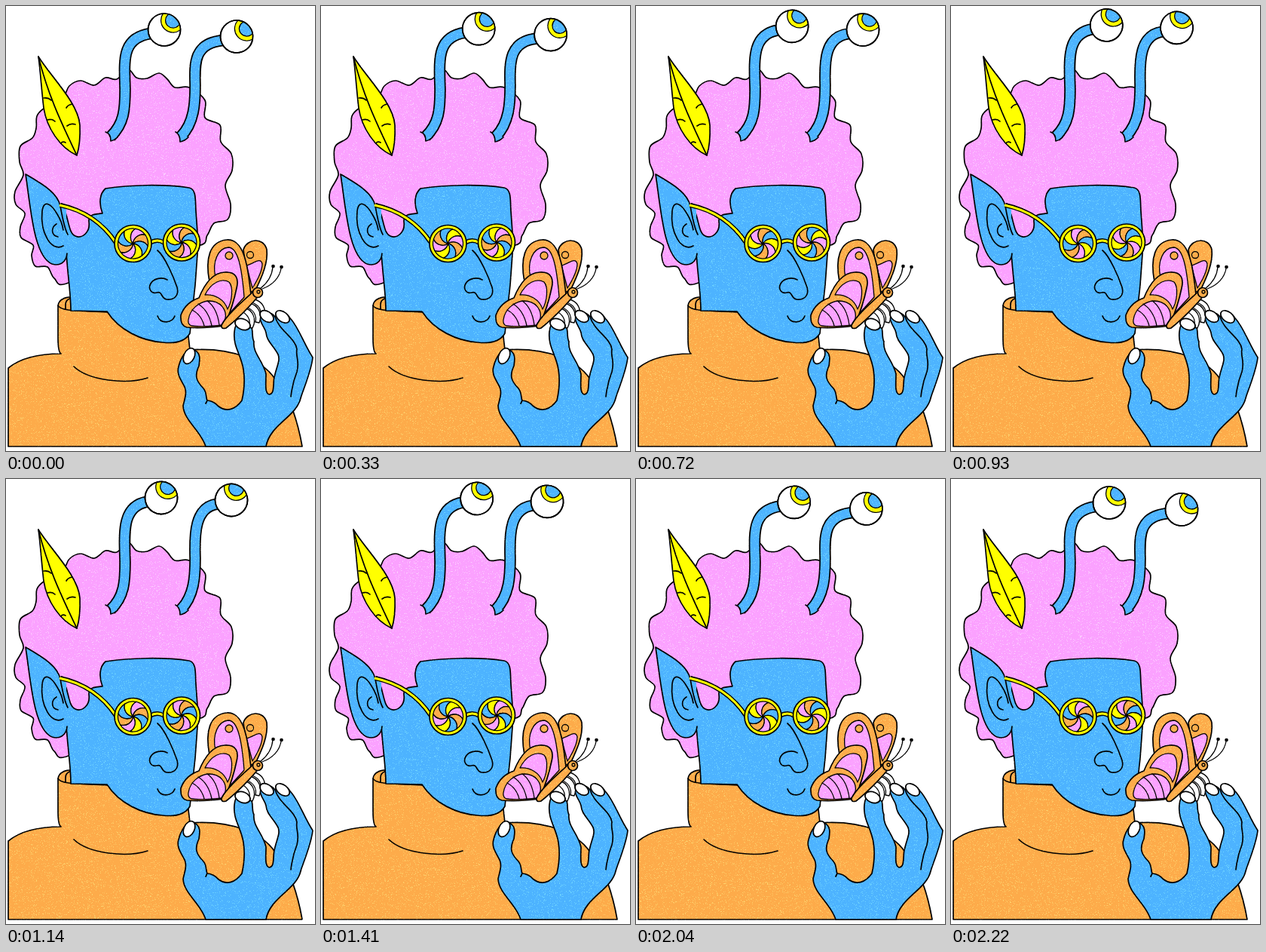
These frames come from a looping animation (410 px wide and 590 px high, 2.25 s). An HTML page with a canvas:

```html
<!DOCTYPE html>
<html lang="en">
<head>
<meta charset="utf-8">
<title>Butterfly friend</title>
<style>
  html, body { margin: 0; width: 100%; height: 100%; overflow: hidden; background: #fff; }
  body { position: relative; isolation: isolate; }
  svg { position: absolute; left: 0; top: 0; display: block; }
  #grain { position: absolute; left: 0; top: 0; mix-blend-mode: overlay; }
  svg * { stroke-linejoin: round; }
  .ink { fill: none; stroke: #000; stroke-width: 1.7; stroke-linecap: round; }
  .frame { stroke-width: 6; stroke-linecap: butt; }
  .gold { stroke: #ff0; stroke-width: 3; stroke-linecap: butt; }
  .thin { stroke-width: 1.3; }
  .blue { fill: #4db3ff; }
  .pink { fill: #fba1ff; }
  .orange { fill: #fdab4a; }
  .yellow { fill: #ff0; }
  .white { fill: #fff; }
</style>
</head>
<body>
<svg width="410" height="590" viewBox="0 0 410 590">
  <defs>
    <clipPath id="eyeball"><circle r="21"/></clipPath>
    <g id="eye">
      <circle class="ink white" r="21.5"/>
      <g class="ink" clip-path="url(#eyeball)">
        <circle class="yellow thin" cx="17" r="16"/>
        <circle class="blue thin" cx="17" r="10"/>
      </g>
      <circle class="ink" r="21.5"/>
    </g>
  </defs>

  <g id="sweater" class="ink">
    <path class="orange" d="M3 584V480C20 466 45 461 73 461Q69 459 69 440V398C69 388 84 384 87 387L240 420L244 456C300 452 345 470 360 500C375 510 388 555 393 584Z"/>
    <path d="M69 397C72 405 100 404 134 406M79 402V396Q79 389 87 387M90 478C110 497 160 502 188 493"/>
  </g>

  <path id="hair" class="ink pink"/>

  <g id="face" class="ink">
    <path class="blue" d="M74 262C84 280 82 301 92 305C101 309 112 300 110 286C109 276 118 276 128 275C123 262 124 249 132 242C165 237 210 236 243 241C253 243 251 258 252 272L255 315L251 370L244 434C236 448 217 447 208 446C180 444 150 430 134 405L86 404C86 380 81 350 80 325Z"/>
    <path class="blue" stroke="none" d="M70 262L80 270V330L66 335Z"/>
    <path class="blue" d="M81 328C80 341 70 345 61 342C37 332 33 270 26 223C48 236 68 247 72 265C75 282 78 296 82 303"/>
    <path d="M76 318C60 327 45 300 48 272C50 256 60 262 68 276C73 284 75 291 76 297M67 289C60 293 59 304 69 306"/>
    <path d="M201 324C211 332 223 361 227 373C230 384 223 390 213 389C205 387 208 378 200 380C193 382 188 375 192 368C196 361 207 359 214 363M201 411C205 422 220 421 224 411"/>
  </g>

  <g id="leaf" class="ink">
    <path class="yellow" d="M43 67C58 92 96 128 98 158Q99 182 94 198C72 188 54 162 50 135C47 110 46 90 43 67Z"/>
    <path d="M43 67C56 120 76 160 94 198M50 122Q56 121 60 125M55 151Q61 149 65 153M73 182Q75 179 79 181M88 130Q82 131 80 135M92 157Q86 155 81 159"/>
  </g>

  <g id="glasses" class="ink">
    <path class="frame" d="M72 264C105 271 130 290 146 314M191 314Q201 308 210 314"/>
    <path class="gold" d="M71 264C105 271 130 290 146 314M191 314Q201 308 210 314"/>
    <circle class="yellow" cx="168.5" cy="315" r="24.5"/>
    <circle class="yellow" cx="233" cy="313.5" r="24.5"/>
    <g class="lens"></g>
    <g class="lens"></g>
  </g>

  <g id="hand" class="ink">
    <path class="blue" d="M265 584C258 562 236 550 235 530C238 518 240 512 237 505C232 495 226 488 229 478C232 466 240 452 250 456C259 460 257 470 256 477C250 490 252 497 262 507C267 513 265 520 267 523Q276 524 281 530C293 540 305 534 313 523C316 510 317 495 315 482C312 462 301 452 303 432C304 418 314 413 322 420C330 428 325 438 329 445C327 460 341 470 345 488C345 500 343 513 349 515C357 515 354 500 356 492C360 475 364 470 361 462C355 450 346 445 345 433C343 425 336 420 337 410C342 403 352 406 357 412C366 404 374 408 377 414C388 425 396 450 407 466C405 485 393 512 391 520C385 545 350 555 345 584Z"/>
    <path d="M357 412C362 430 384 440 386 455C384 465 390 470 386 485Q380 500 378 518M267 523L265 527"/>
    <ellipse class="white" rx="7" ry="11" transform="translate(243 464) rotate(25)"/>
  </g>

  <g id="butterfly" class="ink">
    <path class="white thin" d="M315 400C328 402 333 416 327 427L322 426C326 416 320 408 311 404ZM322 394C336 396 340 410 336 420L331 419C333 410 328 402 318 399ZM329 389C340 391 346 402 342 411L338 411C339 402 335 396 326 393Z"/>
    <path class="orange" d="M315 323C320 308 342 306 346 323C348 341 339 360 331 377L322 380Z"/>
    <path class="pink thin" d="M319 344C328 342 338 332 340 342C340 353 332 366 327 374Z"/>
    <circle class="orange thin" cx="324" cy="330" r="4.5"/>
    <path class="orange" d="M270 366C264 335 270 312 293 310C306 309 314 322 318 338C322 352 323 368 325 382L294 414Z"/>
    <path class="pink thin" d="M278 360C273 338 282 321 295 320C308 320 313 348 316 386L296 408Z"/>
    <circle class="orange thin" cx="296" cy="331" r="5"/>
    <path class="orange" d="M232 410C236 398 246 390 256 387C262 372 272 354 290 353C306 352 309 362 306 374C302 394 296 410 290 424Q260 428 240 426Q231 424 232 410Z"/>
    <path class="pink thin" d="M264 383C272 367 286 360 296 366C302 373 300 391 294 402C290 389 277 382 264 383Z"/>
    <path class="pink thin" d="M242 416C244 402 256 392 269 391C285 391 293 403 291 414L287 423Q262 426 246 424Q241 422 242 416Z"/>
    <path class="thin" d="M247 403Q259 409 263 424M255 395Q269 404 273 424M267 391Q280 400 283 423"/>
    <path class="orange" d="M286 423C293 409 316 390 330 377L336 383C325 397 306 416 292 427Q285 429 286 423Z"/>
    <circle class="orange" cx="334" cy="380" r="6.5"/>
    <circle class="thin" cx="335" cy="379" r="2"/>
    <path class="thin" d="M338 374C347 367 353 357 354 346M340 375C354 370 363 360 365 348"/>
    <circle cx="354.5" cy="345" r="1.5" fill="#000"/>
    <circle cx="365.5" cy="346" r="1.5" fill="#000"/>
  </g>

  <g id="nails" class="ink">
    <ellipse class="white" rx="10.5" ry="7" transform="translate(314 422) rotate(22)"/>
    <ellipse class="white" rx="10" ry="6.5" transform="translate(346 411.5) rotate(35)"/>
    <ellipse class="white" rx="10.5" ry="6.5" transform="translate(367 412) rotate(38)"/>
  </g>

  <g id="stalks"></g>
</svg>
<canvas id="grain" width="510" height="690"></canvas>

<script>
const LOOP = 2250, STEP = 30;
const $ = id => document.getElementById(id);

// Closed smooth curve through a flat list of x, y pairs.
function smoothLoop(xy) {
  const n = xy.length / 2;
  const at = i => { const k = (i + n) % n * 2; return [xy[k], xy[k + 1]]; };
  let d = 'M' + at(0);
  for (let i = 0; i < n; i++) {
    const [a, b, c, e] = [at(i - 1), at(i), at(i + 1), at(i + 2)];
    d += 'C' + [0, 1].map(k => b[k] + (c[k] - a[k]) / 6) + ' '
      + [0, 1].map(k => c[k] - (e[k] - b[k]) / 6) + ' ' + c;
  }
  return d + 'Z';
}

$('hair').setAttribute('d', smoothLoop([
  83, 367, 64, 361, 55, 346, 39, 345, 34, 331, 36, 317, 20, 307, 19, 293, 25, 275,
  13, 263, 12, 246, 23, 224, 18, 207, 19, 186, 35, 175, 40, 162, 41, 146, 50, 136,
  75, 122, 84, 106, 99, 99, 117, 105, 132, 95, 147, 97, 162, 84, 173, 95, 187, 96,
  203, 89, 214, 97, 224, 108, 243, 108, 264, 125, 264, 148, 284, 158, 285, 180,
  299, 196, 300, 218, 291, 238, 298, 263, 294, 283, 276, 288, 267, 304, 254, 318,
  170, 320
]));

const lenses = [...document.querySelectorAll('.lens')];
const lensPose = [{ at: [168.5, 315], turn: -35 }, { at: [233, 313.5], turn: -80 }];
const colours = ['yellow', 'pink', 'orange', 'blue'];
for (const lens of lenses) {
  const r = 20, h = r * Math.SQRT1_2;
  lens.innerHTML = [0, 1, 2, 3, 4, 5, 6, 7].map(i =>
    `<path class="${colours[i % 4]} thin" transform="rotate(${i * 45})"
      d="M0 0A13 13 0 0 1 0 ${-r}A${r} ${r} 0 0 1 ${h} ${-h}A13 13 0 0 0 0 0Z"/>`).join('');
}

const mix = ([a, b], k) => a + (b - a) * k;

// Pairs hold the pose with the stalk leaning right, then pulled up and left.
const stalks = [
  { x: [210, 206], y: [31.5, 25], look: [-47, -59],
    base: 'M139 173C157 156 158 136 158 110', bend: [157, 72], mid: [153, 42],
    foot: 'M132 167Q139 169 139 179Q144 178 148 174' },
  { x: [306, 299], y: [40.5, 28], look: [-38, -67],
    base: 'M232 173C250 155 251 128 251 105', bend: [250, 74], mid: [250, 49],
    foot: 'M225 167Q231 170 231 180Q237 179 242 174' }
];

function drawStalk(s, k) {
  const x = mix(s.x, k), y = mix(s.y, k), midY = s.mid[1] + y - s.y[0];
  const d = `${s.base}C${s.bend} ${s.mid[0]} ${midY} ${x - 18} ${y + 5}`;
  return `<path d="${d}" fill="none" stroke="#000" stroke-width="15.5"/>
    <path d="${d}" fill="none" stroke="#4db3ff" stroke-width="12"/>
    <path class="ink blue" d="${s.foot}"/>
    <use href="#eye" transform="translate(${x} ${y}) rotate(${mix(s.look, k)})"/>`;
}

let seed = 7;
const random = () => (seed = (seed * 1664525 + 1013904223) % 4294967296) / 4294967296;

const grain = $('grain'), g = grain.getContext('2d');
const noise = g.createImageData(grain.width, grain.height);
for (let i = 0; i < noise.data.length; i += 4) {
  noise.data.fill(255, i, i + 3);
  noise.data[i + 3] = random() < 0.16 ? 130 * random() : 0;
}
g.putImageData(noise, 0, 0);

function draw(now) {
  const step = Math.floor(now % LOOP / STEP), phase = step * STEP / LOOP;
  const k = (1 - Math.cos(phase * 2 * Math.PI)) / 2;
  $('stalks').innerHTML = stalks.map(s => drawStalk(s, k)).join('');
  lensPose.forEach(({ at, turn }, i) => lenses[i].setAttribute('transform',
    `translate(${at}) rotate(${phase * 360 + turn})`));
  grain.style.transform = `translate(${-(step * 37 % 100)}px, ${-(step * 61 % 100)}px)`;
  requestAnimationFrame(draw);
}
draw(0);
</script>
</body>
</html>
```
